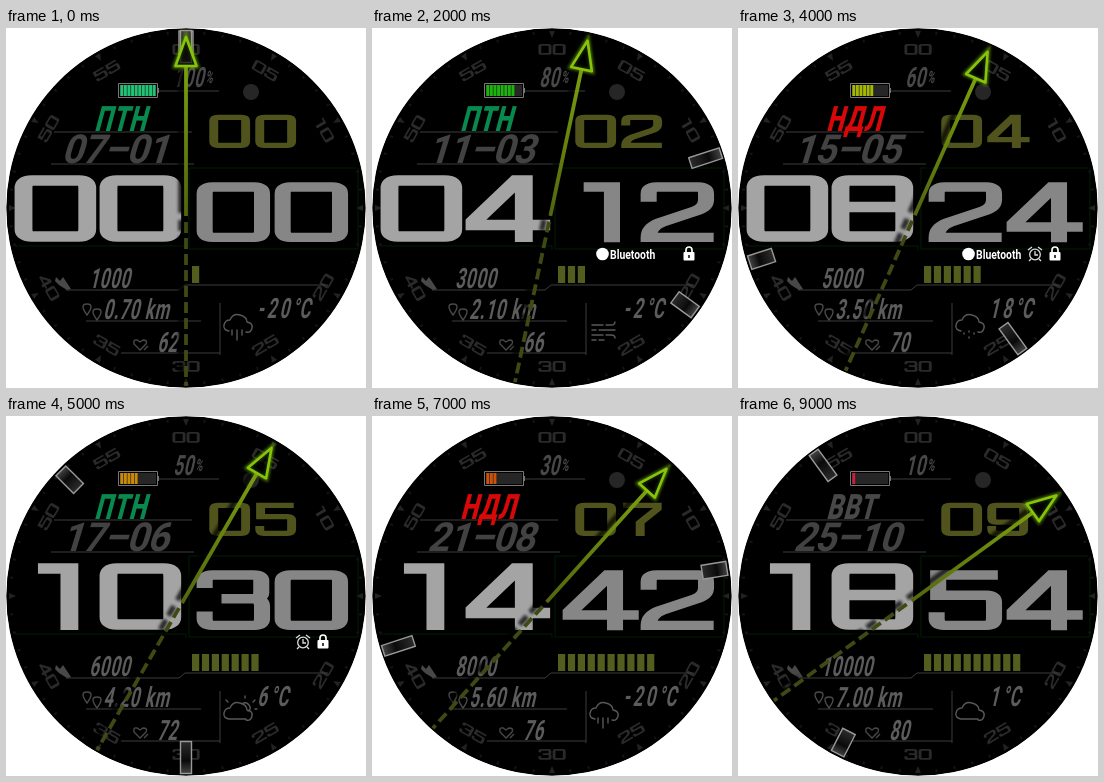
Recreate the animation shown at these times as an HTML page. Size 360 by 360 pixels, loop 10 s.

```html
<!DOCTYPE html>
<html lang="uk">
<head>
<meta charset="utf-8">
<title>Watch face</title>
<style>
html, body { margin: 0; width: 100%; height: 100%; overflow: hidden; background: #fff; }
svg { display: block; width: 100vw; height: 100vh; }
text { font-family: Roboto, "Liberation Sans", sans-serif; font-weight: 700; }
.line { fill: none; stroke: #3c3c3c; stroke-width: 1; }
.icon { fill: none; stroke: #585858; stroke-width: 1.4; stroke-linecap: round; stroke-linejoin: round; }
.digit { fill: none; stroke-width: 10.5; }
</style>
</head>
<body>
<svg viewBox="0 0 360 360">
  <defs>
    <clipPath id="dial"><circle cx="180" cy="180" r="179.7"/></clipPath>
    <linearGradient id="metal" x1="0" y1="0" x2="0" y2="1">
      <stop offset="0" stop-color="#444"/><stop offset=".4" stop-color="#0a0a0a"/>
      <stop offset="1" stop-color="#2c2c2c"/>
    </linearGradient>
    <linearGradient id="needle" gradientUnits="userSpaceOnUse" x1="0" y1="38" x2="0" y2="188">
      <stop offset="0" stop-color="#7a9f0c"/><stop offset="1" stop-color="#53650f"/>
    </linearGradient>
    <filter id="soft" filterUnits="userSpaceOnUse" x="0" y="0" width="360" height="360">
      <feGaussianBlur stdDeviation="1.8"/>
    </filter>
  </defs>
  <g clip-path="url(#dial)">
    <circle cx="180" cy="180" r="180"/>
    <g id="scale"></g>
    <path d="M8 218H180V222M183 221V140H350M183 221H352V140" fill="none" stroke="#031c05"/>
    <path class="line" d="M153 63H213M48 104H186M45 136H188M60 262H173L179 257H322M80 293H195M115 325H214M214 275V327"/>
    <circle cx="245" cy="64" r="8" fill="#262626"/>
    <path d="M50 249l4 4 3-4 4 6 4 6-4 1-8-5-4-4z" fill="#484848"/>
    <g fill="none" stroke="#484848" stroke-width="1.4">
      <path d="M81 287q-8-11 0-11t0 11zM91 292q-8-11 0-11t0 11z"/>
      <path d="M134 322l-6-6q-1-5 3-4l3 2 3-2q5 0 3 4zM138 322l4-4"/>
    </g>
    <g id="face"></g>
  </g>
</svg>
<script>
const STEP = 1000, STATES = 10;

// Centre lines of the digits in a 48 x 67 cell; widening it makes the uprights heavier than the bars
const WIDEN = 1.7;
const ZERO = 'M10 5.5H37.5Q42.5 5.5 42.5 13V54Q42.5 61.5 37.5 61.5H10Q5 61.5 5 54V13Q5 5.5 10 5.5Z';
const BOWL = 'Q42.5 61.5 37.5 61.5H10Q5 61.5 5 54';
const GLYPHS = [
  ZERO,
  'M13.5 5.5H32V67',
  'M5 22V13Q5 5.5 10 5.5H37.5Q42.5 5.5 42.5 13V20Q42.5 28 36 32L13 45Q5 50 5 61.5H47.5',
  'M5 20V13Q5 5.5 10 5.5H37Q42 5.5 42 12V25Q42 32 36 32H16M36 32Q42.5 32 42.5 40V54' + BOWL + 'V46',
  'M34 67V5.5H30L5 46V50H49.5',
  'M45 5.5H6V28H37.5Q42.5 28 42.5 36V54' + BOWL + 'V47',
  'M42.5 20V13Q42.5 5.5 37.5 5.5H10Q5 5.5 5 13V54Q5 61.5 10 61.5H37.5Q42.5 61.5 42.5 54V36Q42.5 28 37.5 28H5',
  'M2 5.5H42V13L22 40V67',
  ZERO + 'M5 32H42.5',
  'M5 47V54Q5 61.5 10 61.5H37.5Q42.5 61.5 42.5 54V13Q42.5 5.5 37.5 5.5H10Q5 5.5 5 13V31Q5 39 10 39H42.5'
];

const CLOUD = 'M223 303q-6-1-5-6t6-5q3-7 10-5t7 7q6 1 5 6t-6 4';
const CLOUDY = CLOUD + 'M223 303H240';
const RAIN = CLOUD + 'M226 302v5M231 302v10M236 302v5';
const DRIZZLE = CLOUD + 'M226 305v1M231 303v1M231 309v1M236 305v1';
const FOG = 'M231 301a5.5 5.5 0 1 0-11 0a5.5 5.5 0 1 0 11 0M244 301a5.5 5.5 0 1 0-11 0a5.5 5.5 0 1 0 11 0M219 292h3M227 291h3M235 291h3M242 292h3M220 311h24';
const WIND = 'M220 297h11M234 297h5q4 0 4-3M220 302h4M227 302h16M220 307h11M234 307h5q4 0 4 3M220 312h4M227 312h5';
const SUN_CLOUD = CLOUDY + 'M236 288q4-3 7 1t-1 6M239 282v-2M247 286l2-2M249 293h2M222 286l-2-2';
const WEATHER = [
  ['-20', RAIN], ['35', FOG], ['-2', WIND], ['12', CLOUDY], ['18', DRIZZLE],
  ['6', SUN_CLOUD], ['30', SUN_CLOUD], ['-20', RAIN], ['35', FOG], ['1', CLOUDY]
];
const BATTERY = ['#1fc474', '#08c808', '#1cb40c', '#5cb000', '#a4b800', '#c98a08', '#cc7008', '#cc5208', '#cc3410', '#c8203c'];
const DAY_NAMES = ['НДЛ', 'ПНД', 'ВВТ', 'СРД', 'ЧТВ', 'ПТН', 'СБТ'];
const DAY_COLORS = { 'НДЛ': '#d80808', 'ПТН': '#088a4e' };

const pad = n => String(n).padStart(2, '0');
const repeat = (n, draw) => Array.from({ length: n }, (_, i) => draw(i)).join('');

function digits(value, x, y, pitch, scale, color) {
  return [...pad(value)].map((d, i) =>
    `<path class="digit" stroke="${color}" d="${GLYPHS[d]}" transform="translate(${x + i * pitch} ${y}) scale(${scale * WIDEN} ${scale})"/>`).join('');
}

// Condensed slanted lettering
function label(text, x, y, { color = '#5c5c5c', size = 28, condense = .6, slant = 13, spacing = 1.2, weight = 700 } = {}) {
  return `<text font-size="${size}" fill="${color}" letter-spacing="${spacing}" style="font-weight:${weight}"
    transform="translate(${x} ${y}) skewX(${-slant}) scale(${condense} 1)">${text}</text>`;
}

function dialScale() {
  const notches = repeat(12, i => `<path d="M177 3h6l-3 7z" fill="#222" transform="rotate(${i * 30} 180 180)"/>`);
  const ticks = repeat(60, i => `<path d="M180 3v3" stroke="#141414" stroke-width="2" transform="rotate(${i * 6} 180 180)"/>`);
  const numbers = repeat(12, i => {
    if (i % 6 === 3) return '';
    const flip = i > 3 && i < 9 ? 180 : 0;
    return `<g transform="rotate(${i * 30} 180 180) rotate(${flip} 180 21.5)">${digits(i * 5, 166.5, 16, 14.2, .16, '#2a2a2a')}</g>`;
  });
  return ticks + notches + numbers;
}

function battery(k) {
  const cells = repeat(10 - k, i => `<rect x="${114.3 + i * 3.6}" y="57" width="2.9" height="11" fill="${BATTERY[k]}"/>`);
  return `<rect x="114" y="57" width="36" height="11" fill="#262626"/>${cells}
    <path d="M112.5 55.5H151.5V69.5H112.5ZM152.5 60v5" fill="none" stroke="#777"/>` +
    label(`${100 - 10 * k}<tspan font-size="17" dy="-4">%</tspan>`, 167, 59, { color: '#484848' });
}

function calendar(k) {
  const day = 7 + 2 * k, month = k;
  const name = DAY_NAMES[new Date(2022, month, day).getDay()];
  return label(name, 88, 103, { color: DAY_COLORS[name] || '#484848', size: 35, condense: .7, slant: 15, weight: 900 }) +
    label(`${pad(day)}–${pad(month + 1)}`, 55, 135, { color: '#424242', size: 40, condense: .95, slant: 17, spacing: -1 });
}

function status(k) {
  const link = `<circle cx="230.5" cy="226" r="6.3" fill="#fff"/>
    <text font-size="13" fill="#fff" transform="translate(238 230.5) scale(.8 1)">Bluetooth</text>`;
  const alarm = `<g fill="none" stroke="#ddd" stroke-width="1.3"><circle cx="297" cy="226.5" r="5.3"/>
    <path d="M297 223v4h3M290 222l4-3M304 222l-4-3M293 231l-2 2M301 231l2 2"/></g>`;
  const lock = `<rect x="311.5" y="224" width="11" height="8.5" rx="1" fill="#fff"/>
    <path d="M314 224v-2a3 3 0 0 1 6 0v2" fill="none" stroke="#fff" stroke-width="1.7"/>
    <path d="M317 227v3" stroke="#000" stroke-width="1.5"/>`;
  return (k >= 1 && k <= 4 ? link : '') + (k >= 3 && k <= 5 ? alarm : '') + (k >= 2 && k <= 6 ? lock : '');
}

function activity(k) {
  const steps = 1000 * (k + 1), bars = Math.min(10, Math.floor(steps / 800));
  return label(steps, 83, 260) +
    label(`${(.7 * (k + 1)).toFixed(2)} km`, 97, 291) +
    label(62 + 2 * k, 151, 324) +
    repeat(bars, i => `<rect x="${186 + i * 9.9}" y="238" width="7.2" height="17" fill="#535d1d"/>`);
}

function weather(k) {
  const [degrees, icon] = WEATHER[k];
  return label(`<tspan letter-spacing="5">${degrees}</tspan>°C`, 251, 290) + `<path class="icon" d="${icon}"/>`;
}

function marker(angle, radius, width, length) {
  return `<rect x="${180 - width / 2}" y="${180 - radius - length / 2}" width="${width}" height="${length}"
    fill="url(#metal)" stroke="#999" stroke-width="1.4" transform="rotate(${angle} 180 180)"/>`;
}

function secondHand(angle) {
  const turn = `transform="rotate(${angle} 180 180)"`;
  const arrow = 'M180 9L190.5 38H169.5Z', tail = 'M180 194V358';
  return `<g filter="url(#soft)" opacity=".75" transform="translate(-5 -2)"><g ${turn} fill="none" stroke="#000" stroke-width="5.5">
      <path d="M180 38V187"/><path d="${tail}" stroke-dasharray="11 5"/></g></g>
    <g filter="url(#soft)"><path d="${arrow}" ${turn} fill="none" stroke="#6fae00" stroke-width="5" opacity=".7"/></g>
    <g ${turn} fill="none">
      <rect x="178.1" y="38" width="3.8" height="150" fill="url(#needle)"/>
      <path d="${tail}" stroke="#3e4a13" stroke-width="3.8" stroke-dasharray="11 5"/>
      <path d="${arrow}" fill="#000" fill-opacity=".65" stroke="#86c40c" stroke-width="2.6" stroke-linejoin="round"/>
    </g>`;
}

function draw(k) {
  const hours = 2 * k, minutes = 6 * k;
  return battery(k) + calendar(k) + activity(k) + weather(k) +
    digits(k, 203.5, 86.5, 46, .5, '#50541c') +
    digits(hours, 9, 147, 85, 1, '#a4a4a4') +
    digits(minutes, 191, 154, 78, .9, '#868686') +
    status(k) +
    marker((hours + minutes / 60) * 30, 164.5, 14, 25) +
    marker(minutes * 6, 161.5, 11, 32) +
    secondHand(k * 6);
}

document.getElementById('scale').innerHTML = dialScale();
const face = document.getElementById('face');
let shown = -1;

function tick() {
  const k = Math.floor(performance.now() / STEP) % STATES;
  if (k !== shown) face.innerHTML = draw(shown = k);
  requestAnimationFrame(tick);
}
tick();
</script>
</body>
</html>
```
